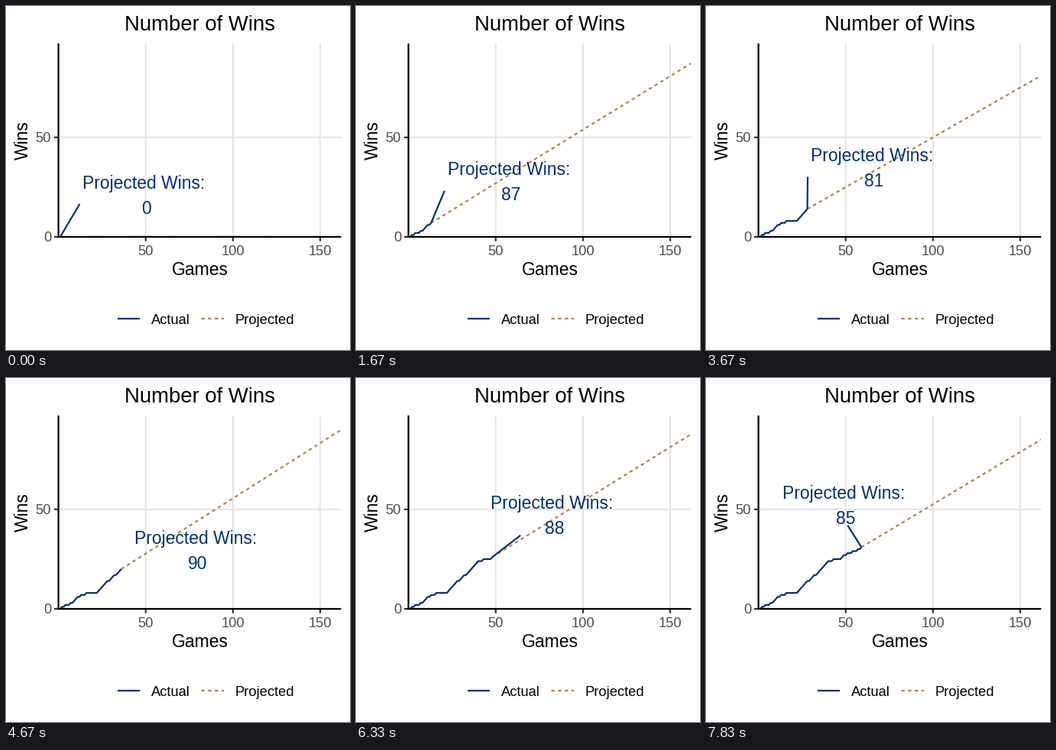
Write a matplotlib script that moves like this. It is 450 by 450 pixels and loops after 8 s.

```python
import numpy as np
import matplotlib.pyplot as plt
from matplotlib.animation import FuncAnimation
from matplotlib.patches import Rectangle

SIZE, DPI = 450, 100
PT = 72 / DPI                       # points per pixel
STEPS, LOOP, TICK = 48, 8000, 40    # data steps, loop and tick in ms
SEASON = 162
LEFT, RIGHT, TOP, BOTTOM = 68.6, 438.4, 49, 302
NAVY, TAN = "#003078", "#b0864c"
BASE = 22.9                         # font size in pixels
LINE = 2.2

RESULTS = "LWLWLLWLWWWLWLLWLLLLLLWWWWWWLWWWLWWWWWWWLLWLLLLWWLWLLWLLWLW"
wins = np.cumsum([r == "W" for r in RESULTS])
games = np.arange(1, len(RESULTS) + 1)

# label offset from the current point, by step
KEYS = [0, 10, 14, 22, 28, 29, 35, 38]
OFF_X = [109.5, 101.5, 91, 84.5, 97, 97, 88, 78.5]
OFF_Y = [-55, -54, -55, -54, -24, -14, -25, -55]
FLIP, FLIP_X = 40, 179.7
HALF_W = 84

plt.rcParams["font.family"] = "Liberation Sans"
fig = plt.figure(figsize=(SIZE / DPI, SIZE / DPI), dpi=DPI, facecolor="white")
ax = fig.add_axes([0, 0, 1, 1])
ax.set_xlim(0, SIZE)
ax.set_ylim(SIZE, 0)
ax.axis("off")
panel = Rectangle((LEFT, TOP), RIGHT - LEFT, BOTTOM - TOP,
                  transform=ax.transData)


def sx(game):
    return LEFT + (RIGHT - LEFT) * game / SEASON


def sy(win):
    return BOTTOM - (BOTTOM - TOP) * win / 97.2


def line(xs, ys, color, z, width=LINE, dashed=False, clip=False):
    art, = ax.plot(xs, ys, color=color, lw=width * PT, zorder=z, snap=False,
                   solid_capstyle="butt", dash_capstyle="butt",
                   ls=(0, (2, 2)) if dashed else "-")
    if clip:
        art.set_clip_path(panel)
    return art


def text(x, y, s, size, color="black", ha="center", **kw):
    return ax.text(x, y, s, fontsize=size * PT, color=color, ha=ha,
                   va="baseline", zorder=6, **kw)


def draw_axes():
    small = BASE * 0.8
    for g in (50, 100, 150):
        x = sx(g)
        line([x, x], [TOP, BOTTOM], "#e6e6e6", 1)
        line([x, x], [BOTTOM, BOTTOM + 5.7], "#333333", 4)
        text(x, 326.5, str(g), small, "#4d4d4d")
    line([LEFT, RIGHT], [sy(50)] * 2, "#e6e6e6", 1)
    for w in (0, 50):
        line([LEFT - 5.7, LEFT], [sy(w)] * 2, "#333333", 4)
        text(59, sy(w) + 6.5, str(w), small, "#4d4d4d", "right")
    line([LEFT, LEFT], [TOP, BOTTOM + 1], "black", 5)
    line([LEFT - 1, RIGHT], [BOTTOM] * 2, "black", 5)

    mid = (LEFT + RIGHT) / 2
    text(mid, 32.3, "Number of Wins", BASE * 1.2)
    text(mid, 352.3, "Games", BASE)
    ax.text(33.5, (TOP + BOTTOM) / 2, "Wins", fontsize=BASE * PT, rotation=90,
            ha="right", va="center", zorder=6)

    line([146, 175], [409, 409], NAVY, 3)
    text(189.5, 416, "Actual", small, ha="left")
    line([255.5, 285], [409, 409], TAN, 3, dashed=True)
    text(299.5, 416, "Projected", small, ha="left")


draw_axes()
projected = line([], [], TAN, 2, dashed=True, clip=True)
actual = line([], [], NAVY, 3, clip=True)
pointer = line([], [], NAVY, 3)
caption = text(0, 0, "Projected Wins:", BASE, NAVY)
count = text(0, 0, "", BASE, NAVY)


def label_center(i, px, py):
    if i >= FLIP:
        return FLIP_X, py - 55
    return px + np.interp(i, KEYS, OFF_X), py + np.interp(i, KEYS, OFF_Y)


def pointer_end(px, cx, cy):
    if px < cx - HALF_W:
        return cx - HALF_W, cy + 12
    gap = cx - px
    return px + np.sign(gap) * min(abs(gap), 2.7 * abs(gap) ** 0.6), cy + 26.5


def update(frame):
    # the step reached by the end of this tick
    i = ((frame + 1) * TICK - 1) * STEPS // LOOP
    n = int(1 + 58 * i / 47 + 0.5)
    won = wins[n - 1]
    final = won / n * SEASON
    px, py = sx(n), sy(won)

    actual.set_data(sx(games[:n]), sy(wins[:n]))
    projected.set_data([px, sx(SEASON)], [py, sy(final)])

    cx, cy = label_center(i, px, py)
    caption.set_position((cx, cy - 8.5))
    count.set_position((cx + 3, cy + 24.5))
    count.set_text(str(int(final + 0.5)))

    ex, ey = pointer_end(px, cx, cy)
    pointer.set_data([px, ex], [py, ey])
    pointer.set_visible(bool(np.hypot(ex - px, ey - py) > 20))
    return actual, projected, pointer, caption, count


anim = FuncAnimation(fig, update, frames=LOOP // TICK, interval=TICK,
                     repeat=True, repeat_delay=0, blit=False)
plt.show()
```
